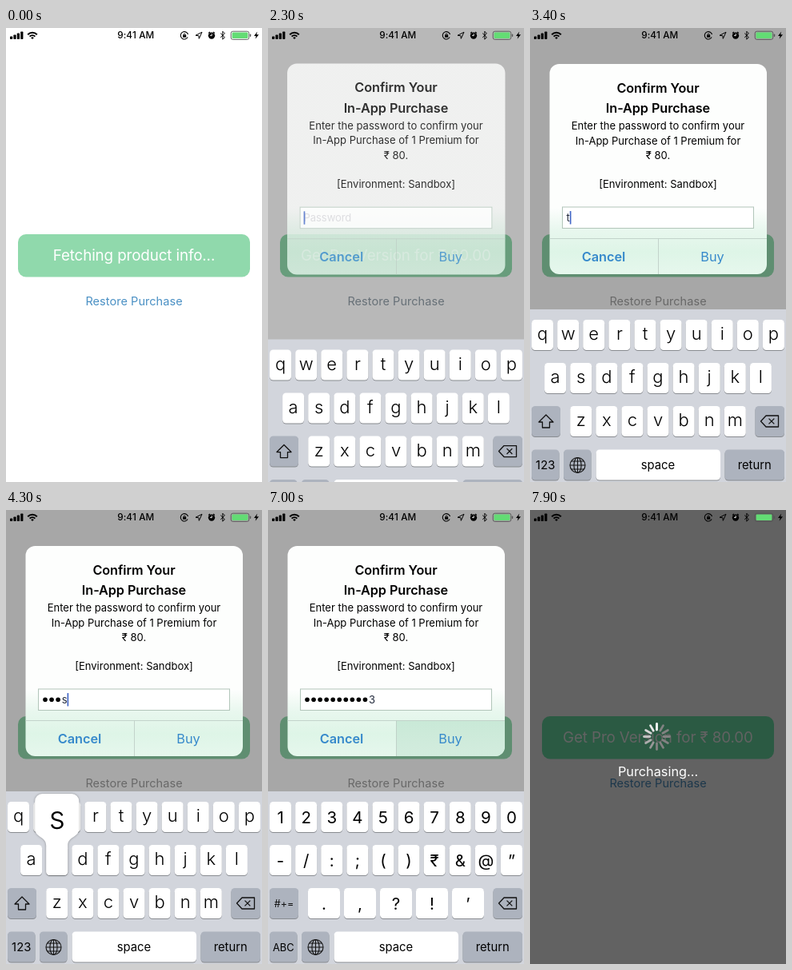
An HTML page with a canvas for the animation above (8 s loop, 320x568 px).

```html
<!DOCTYPE html>
<html lang="en">
<head>
<meta charset="utf-8">
<title>In-app purchase</title>
<style>
html, body { margin: 0; width: 100%; height: 100%; overflow: hidden; background: #fff; }
canvas { display: block; width: 320px; height: 568px; }
</style>
</head>
<body>
<canvas id="stage"></canvas>
<script>
const LOOP = 8000, W = 320, H = 568;
const FONT = 'Inter, "Liberation Sans", sans-serif';
const canvas = document.getElementById('stage');
const ratio = window.devicePixelRatio || 1;
canvas.width = W * ratio;
canvas.height = H * ratio;
const c = canvas.getContext('2d');

// Typed characters and the moment each one lands in the field
const typed = [
  ['t', 3100], ['e', 3500], ['s', 3900], ['s', 4250],
  ['p', 4500], ['a', 4720], ['s', 4920], ['s', 5140],
  ['1', 5850], ['2', 6150], ['3', 6450]
];
const LETTERS = ['qwertyuiop', 'asdfghjkl', 'zxcvbnm'];
const SYMBOLS = ['1234567890', '-/:;()₹&@”', '.,?!’'];
const PITCH = 32.1, KEY_W = 27, KEY_H = 38;
const GRAY = '#adb3be', KEY_SHADE = '#888b90';

const clamp = v => Math.max(0, Math.min(1, v));
const ramp = (t, a, b) => clamp((t - a) / (b - a));
const easeOut = v => 1 - Math.pow(1 - v, 3);
const smooth = v => v * v * (3 - 2 * v);
const mix = (a, b, k) => `rgb(${a.map((v, i) => Math.round(v + (b[i] - v) * k))})`;

function text(s, x, y, size, color = '#000', weight = 400, spacing = 0, align = 'center') {
  c.font = `${weight} ${size}px ${FONT}`;
  c.letterSpacing = spacing + 'px';
  c.textAlign = align;
  c.fillStyle = color;
  c.fillText(s, x + (align === 'center' ? spacing / 2 : 0), y);
}

function box(x, y, w, h, r, fill) {
  c.beginPath();
  c.roundRect(x, y, w, h, r);
  c.fillStyle = fill;
  c.fill();
}

function line(points, width = 1, color = '#000', close = false) {
  c.beginPath();
  points.forEach(([x, y]) => c.lineTo(x, y));
  if (close) c.closePath();
  c.lineWidth = width;
  c.strokeStyle = color;
  c.stroke();
}

function arc(x, y, r, a, b, width) {
  c.beginPath();
  c.arc(x, y, r, a, b);
  c.lineWidth = width;
  c.stroke();
}

function dot(x, y, r, fill) {
  c.beginPath();
  c.arc(x, y, r, 0, 7);
  c.fillStyle = fill;
  c.fill();
}

function fade(y0, y1, ...colors) {
  const g = c.createLinearGradient(0, y0, 0, y1);
  colors.forEach((color, i) => g.addColorStop(i / (colors.length - 1), color));
  return g;
}

function statusBar() {
  for (let i = 0; i < 4; i++) box(5 + i * 4.4, 10.5 - i * 2, 3.2, 3.5 + i * 2, 0.7, '#000');
  c.strokeStyle = '#000';
  for (const r of [4.8, 8.2]) arc(33, 14, r, -Math.PI * 0.75, -Math.PI * 0.25, 2);
  c.beginPath();
  c.moveTo(33, 14);
  c.arc(33, 14, 2.6, -Math.PI * 0.75, -Math.PI * 0.25);
  c.fillStyle = '#000';
  c.fill();
  text('9:41 AM', 162.2, 13.2, 11.7, '#000', 500, 0.15);

  c.strokeStyle = '#000';
  arc(223, 9.3, 4.7, 0.5, 6, 1.1);
  box(221, 8.6, 4.2, 3.2, 0.5, '#000');
  arc(223.1, 8.6, 1.4, Math.PI, 0, 0.8);
  line([[237, 9.3], [245, 5.2], [241.3, 13.3], [240.8, 9.6]], 1, '#000', true);

  dot(257, 9.6, 4.2, '#000');
  line([[253.2, 6.6], [255, 5]], 1.3);
  line([[260.8, 6.6], [259, 5]], 1.3);
  line([[257.2, 7], [257.2, 9.8], [255, 9.2]], 0.9, '#fff');
  line([[268.2, 6.6], [273.4, 11.7], [270.8, 14.2], [270.8, 4.2], [273.4, 6.8], [268.2, 11.9]], 0.95);

  c.beginPath();
  c.roundRect(281.2, 4.2, 22.6, 10.2, 2.4);
  c.lineWidth = 0.9;
  c.strokeStyle = '#555';
  c.stroke();
  box(282.6, 5.6, 19.8, 7.4, 1.2, '#63dc74');
  box(304.8, 7.6, 1.4, 3.4, 0.7, '#555');
  c.beginPath();
  [[314.2, 4.6], [310, 9.9], [312.6, 9.9], [311.6, 13.8], [316, 8.3], [313.2, 8.3]].forEach(p => c.lineTo(...p));
  c.fillStyle = '#000';
  c.fill();
}

function page(t, dim, hud) {
  box(0, 0, W, H, 0, '#fff');
  box(15, 258, 290, 53.5, 10, mix([144, 217, 172], [113, 234, 176], hud));
  const title = t >= 800 ? 'Get Pro Version for ₹ 80.00' : 'Fetching product info...';
  text(title, 160, 291, 18.8, '#fff', 400, -0.12);
  text('Restore Purchase', 160, 347, 14.5, mix([74, 144, 196], [158, 158, 158], dim), 400, 0.05);
}

function field(t) {
  box(40, 223.5, 240, 27.5, 0, '#fff');
  c.lineWidth = 1;
  c.strokeStyle = '#b2c6ba';
  c.strokeRect(40.5, 224, 239, 26.5);
  const done = typed.filter(k => t >= k[1]);
  const n = done.length;
  let x = 45;
  if (!n) {
    text('Password', 45, 242, 13, '#d6d6da', 400, -0.1, 'left');
  } else {
    for (let i = 0; i < n - 1; i++) dot(49 + i * 8.05, 237.2, 2.8, '#000');
    x = 45.5 + (n - 1) * 8.05;
    text(done[n - 1][0], x, 242, 13, '#222a3c', 400, 0, 'left');
    x += c.measureText(done[n - 1][0]).width;
  }
  const since = t - (n ? done[n - 1][1] : 2200);
  if (since % 1000 < 520 && t < 7000) box(x, 229, 1.7, 16.5, 0.6, '#4468c8');
}

function alertBox(t, show, scale) {
  if (show <= 0) return;
  c.save();
  c.globalAlpha = show;
  c.translate(160, 176.5);
  c.scale(scale, scale);
  c.translate(-160, -176.5);
  box(24.5, 45, 271.5, 263, 12, fade(225, 308, '#fdfefd', '#e8f7ee', '#def5e7', '#e6f7ed'));
  if (t > 6880) box(160, 263.5, 136, 44.5, [0, 0, 12, 0], fade(263, 308, '#c9e9d7', '#d3ecde'));
  text('Confirm Your', 160, 80.8, 16.2, '#000', 600, -0.05);
  text('In-App Purchase', 160, 105.8, 16.2, '#000', 600, -0.05);
  ['Enter the password to confirm your', 'In-App Purchase of 1 Premium for', '₹ 80.', '', '[Environment: Sandbox]']
    .forEach((s, i) => text(s, 160, 127.3 + i * 18.2, 13, '#000', 400, 0));
  field(t);
  line([[24.5, 263.5], [296, 263.5]], 0.8, '#bccbc3');
  line([[160.5, 263.5], [160.5, 308]], 0.8, '#bccbc3');
  text('Cancel', 92, 291.5, 16.3, '#3689cb', 600);
  text('Buy', 228, 291.5, 16.3, '#3689cb');
  c.restore();
}

function key(x, y, w, fill = '#fff') {
  box(x, y + 1, w, KEY_H, 4.5, KEY_SHADE);
  box(x, y, w, KEY_H, 4.5, fill);
}

// Centre, top and width of every character key of a layout
function layout(rows, symbols) {
  const keys = {};
  rows.forEach((row, r) => {
    const wide = symbols && r === 2;
    const pitch = wide ? 45 : PITCH;
    [...row].forEach((ch, i) => {
      keys[ch] = { x: 160 + (i - (row.length - 1) / 2) * pitch, y: 13 + r * 54, w: wide ? 40 : KEY_W };
    });
  });
  return keys;
}
const letterKeys = layout(LETTERS, false), symbolKeys = layout(SYMBOLS, true);

function shiftIcon() {
  const half = [[0, -8.5], [9, 0.5], [4.5, 0.5], [4.5, 7.5]];
  const mirror = half.slice(1).reverse().map(([x, y]) => [-x, y]);
  line([...half, ...mirror].map(([x, y]) => [20 + x, 140.5 + y]), 1.3, '#111', true);
}

function deleteIcon() {
  line([[288.5, 140], [295, 133], [310.5, 133], [310.5, 147], [295, 147]], 1.3, '#111', true);
  line([[298.5, 136.6], [305.3, 143.4]], 1.3, '#111');
  line([[305.3, 136.6], [298.5, 143.4]], 1.3, '#111');
}

function globe() {
  c.strokeStyle = '#111';
  for (const rx of [9.5, 4.6]) {
    c.beginPath();
    c.ellipse(59.5, 195, rx, 9.5, 0, 0, 7);
    c.lineWidth = 1.1;
    c.stroke();
  }
  line([[59.5, 185.5], [59.5, 204.5]], 1, '#111');
  line([[50, 195], [69, 195]], 1, '#111');
  line([[51.8, 190], [67.2, 190]], 1, '#111');
  line([[51.8, 200], [67.2, 200]], 1, '#111');
}

function popup(ch, k) {
  const left = Math.max(2, Math.min(263, k.x - 27.5)), right = left + 55;
  const a = k.x - KEY_W / 2, b = k.x + KEY_W / 2;
  const top = k.y - 64, mid = k.y - 20, neck = k.y + 1, end = k.y + KEY_H;
  c.save();
  c.shadowColor = 'rgba(0,0,0,.35)';
  c.shadowBlur = 3;
  c.beginPath();
  c.moveTo(left + 9, top);
  c.arcTo(right, top, right, mid, 9);
  c.lineTo(right, mid);
  c.bezierCurveTo(right, mid + 11, b, mid + 9, b, neck);
  c.arcTo(b, end, a, end, 4.5);
  c.arcTo(a, end, a, neck, 4.5);
  c.lineTo(a, neck);
  c.bezierCurveTo(a, mid + 9, left, mid + 11, left, mid);
  c.arcTo(left, top, left + 9, top, 9);
  c.fillStyle = '#fff';
  c.fill();
  c.restore();
  text(ch, left + 27.5, top + 44, 39, '#000', 300);
}

function keyboard(t, y) {
  if (y >= H) return;
  const symbols = t >= 5330;
  const keys = symbols ? symbolKeys : letterKeys;
  c.save();
  c.translate(0, y);
  c.lineJoin = 'round';
  box(0, 0, W, H - 352 + 4, 0, '#d2d5dc');
  for (const [ch, k] of Object.entries(keys)) {
    key(k.x - k.w / 2, k.y, k.w);
    text(ch, k.x, k.y + (symbols ? 26.5 : 25), symbols ? 20.5 : 22, '#000', symbols ? 400 : 300);
  }
  key(2, 121, 36, GRAY);
  key(281.5, 121, 36.5, GRAY);
  key(2, 175.5, 34.5, GRAY);
  key(42, 175.5, 34.5, GRAY);
  key(82.5, 175.5, 155.5);
  key(243.5, 175.5, 74.5, GRAY);
  if (symbols) text('#+=', 20, 145, 12.5, '#111');
  else shiftIcon();
  deleteIcon();
  globe();
  text(symbols ? 'ABC' : '123', 19.2, 200, symbols ? 12.8 : 14.8);
  text('space', 160, 199.7, 14.8);
  text('return', 280.7, 199.7, 14.8);
  const hit = typed.find(([, at]) => t >= at - 90 && t < at + 90);
  if (hit) popup(hit[0], keys[hit[0]]);
  c.restore();
}

function loader(t, alpha) {
  if (alpha <= 0) return;
  c.save();
  c.globalAlpha = alpha;
  text('Purchasing...', 160, 333, 16.3, '#fff');
  c.translate(158.5, 283.5);
  c.lineCap = 'round';
  const head = Math.floor((t - 7900) / 83.34) + 120;
  for (let i = 0; i < 12; i++) {
    const age = (head - i) % 12;
    const a = i * Math.PI / 6;
    const v = Math.round(255 - 125 * Math.min(1, age / 6));
    line([8.5, 16].map(r => [r * Math.sin(a), -r * Math.cos(a)]), 2.8, `rgb(${v},${v},${v})`);
  }
  c.restore();
}

function draw(t) {
  c.setTransform(ratio, 0, 0, ratio, 0, 0);
  const enter = ramp(t, 2050, 2400), leave = ramp(t, 7120, 7420);
  const hud = smooth(ramp(t, 7380, 7680));
  const dim = smooth(enter) * (1 - smooth(leave));
  page(t, dim, hud);
  box(0, 0, W, H, 0, `rgba(0,0,0,${1 - (1 - 0.345 * dim) * (1 - 0.615 * hud)})`);
  statusBar();
  alertBox(t, dim, 1 + 0.15 * (1 - easeOut(enter)));
  const up = easeOut(ramp(t, 2080, 2580)), down = smooth(ramp(t, 7120, 7450));
  keyboard(t, H - 216 * up * (1 - down));
  loader(t, hud);
}

function tick(now) {
  draw(now % LOOP);
  requestAnimationFrame(tick);
}
requestAnimationFrame(tick);
</script>
</body>
</html>
```
